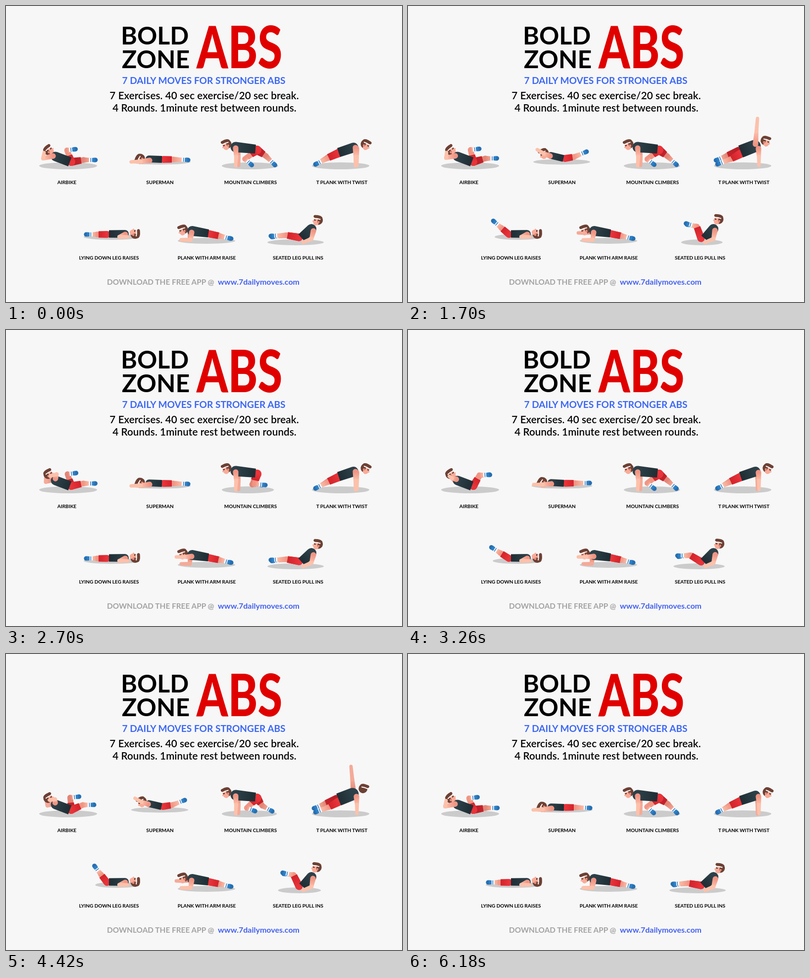
An HTML page with a canvas for the animation above (6.22 s loop, 800 by 600 pixels).

```html
<!DOCTYPE html>
<html lang="en">
<head>
<meta charset="utf-8">
<title>Daily moves</title>
<style>
html, body { margin: 0; width: 100%; height: 100%; overflow: hidden; background: #f7f7f7; }
canvas, svg { position: absolute; left: 0; top: 0; width: 800px; height: 600px; }
text { font-family: Lato, "Open Sans", sans-serif; font-weight: 700; }
.title { font-size: 50px; }
.big { font-size: 119px; font-weight: 800; fill: #e00000; }
.mid { text-anchor: middle; }
.sub { font-size: 19.1px; fill: #3b67f6; }
.info { font-size: 20.6px; font-weight: 600; letter-spacing: .1px; }
.label { font-size: 10px; }
.foot { font-size: 15.4px; fill: #a3a3a3; }
.link { font-size: 16px; fill: #4361ee; }
</style>
</head>
<body>
<canvas id="stage" width="800" height="600"></canvas>
<svg viewBox="0 0 800 600">
  <text class="title" x="232" y="78">BOLD</text>
  <text class="title" x="234" y="126">ZONE</text>
  <text class="big" transform="translate(385 126) scale(.76 1)">ABS</text>
  <text class="mid sub" x="399.5" y="158">7 DAILY MOVES FOR STRONGER ABS</text>
  <text class="mid info" x="400.5" y="189">7 Exercises. 40 sec exercise/20 sec break.</text>
  <text class="mid info" x="401" y="214">4 Rounds. 1minute rest between rounds.</text>
  <g class="mid label">
    <text x="123" y="361">AIRBIKE</text>
    <text x="311" y="361">SUPERMAN</text>
    <text x="494" y="361">MOUNTAIN CLIMBERS</text>
    <text x="678.5" y="361">T PLANK WITH TWIST</text>
    <text x="208" y="514">LYING DOWN LEG RAISES</text>
    <text x="405.5" y="514">PLANK WITH ARM RAISE</text>
    <text x="590" y="514">SEATED LEG PULL INS</text>
  </g>
  <text class="foot" x="204" y="565">DOWNLOAD THE FREE APP @</text>
  <text class="link" x="428" y="565">www.7dailymoves.com</text>
</svg>
<script>
const ctx = document.getElementById('stage').getContext('2d');
const LOOP = 6220, STEP = 40, HOLD = 100;

// Colour pairs run along a limb from its first end to its second.
const SKIN = ['#f09584', '#fcc1ab'], SKIN_FAR = ['#e38576', '#f4aa97'];
const RED = ['#e8343a', '#d3222a'], RED_FAR = ['#b51f27', '#c4232b'];
const TANK = ['#2d4048', '#1f2d34'];
const HAIR = '#6d4034', BLUE = '#2f80c6', SHADOW = '#cbcbcb', FACE = '#f8ab98';

const mix = (a, b, u) => a + (b - a) * u;
const at = (p, q, u) => [mix(p[0], q[0], u), mix(p[1], q[1], u)];
const polar = (p, deg, r) => {
  const a = deg * Math.PI / 180;
  return [p[0] + r * Math.cos(a), p[1] + r * Math.sin(a)];
};
// Curve through three points, with the middle one at u = 0.5.
const through = (p, m, q, u) => p.map((v, i) =>
  v * (1 - u) * (1 - 2 * u) + m[i] * 4 * u * (1 - u) + q[i] * u * (2 * u - 1));
const ease = u => { u = Math.min(1, Math.max(0, u)); return u * u * (3 - 2 * u); };
const swing = u => (1 - Math.cos(Math.PI * u)) / 2;

function track(t, ...keys) {
  let [t0, v0] = keys[0];
  for (const [t1, v1] of keys) {
    if (t < t1) return mix(v0, v1, ease((t - t0) / (t1 - t0)));
    [t0, v0] = [t1, v1];
  }
  return v0;
}

function ellipse(x, y, rx, ry, fill, turn = 0) {
  ctx.fillStyle = fill;
  ctx.beginPath();
  ctx.ellipse(x, y, rx, ry, turn, 0, 7);
  ctx.fill();
}

function shadow(left, right, y, ry) {
  ellipse((left + right) / 2, y, (right - left) / 2, ry, SHADOW);
}

// Tapered bar with a round start; the end is round, or cut straight for a hem.
function limb(p, q, r1, r2, colors, hem) {
  const a = Math.atan2(q[1] - p[1], q[0] - p[0]), h = Math.PI / 2;
  const g = ctx.createLinearGradient(p[0], p[1], q[0], q[1]);
  colors.forEach((c, i) => g.addColorStop(i, c));
  ctx.fillStyle = g;
  ctx.beginPath();
  ctx.arc(p[0], p[1], r1, a + h, a + 3 * h);
  if (hem) {
    for (const s of [-h, h]) ctx.lineTo(q[0] + r2 * Math.cos(a + s), q[1] + r2 * Math.sin(a + s));
  } else {
    ctx.arc(q[0], q[1], r2, a - h, a + h);
  }
  ctx.fill();
}

const torso = (shoulder, waist, r1, r2) => limb(shoulder, waist, r1, r2, TANK, true);

function arm(shoulder, elbow, hand, far) {
  const c = far ? SKIN_FAR : SKIN;
  limb(shoulder, elbow, 5.6, 4, c);
  limb(elbow, hand, 4, 3.4, [c[1], c[1]]);
}

function shin(knee, foot, far) {
  const dx = foot[0] - knee[0], dy = foot[1] - knee[1], d = Math.hypot(dx, dy);
  ctx.save();
  ctx.translate(...knee);
  ctx.rotate(Math.atan2(dy, dx));
  limb([0, 0], [Math.max(1, d - 9), 0], 5.6, 4, far ? SKIN_FAR : SKIN);
  limb([d - 1, 0], [d + 2, 0], 4.6, 4.6, [BLUE, '#256fb2']);
  for (const [x, w, c] of [[-11, 8, '#fff'], [-8.2, 1.6, BLUE], [-4.8, 2.6, BLUE]]) {
    ctx.fillStyle = c;
    ctx.fillRect(d + x, -4.1, w, 8.2);
  }
  ctx.restore();
}

// hem: how much of the thigh the shorts cover.
function leg(hip, knee, foot, far, r = 7.5, hem = .95) {
  const c = far ? SKIN_FAR : SKIN;
  limb(hip, knee, 6, 5.6, [c[0], c[0]]);
  shin(knee, foot, far);
  limb(hip, at(hip, knee, hem), r, 6.6, far ? RED_FAR : RED, true);
}

function head(p, deg, flip, back) {
  ctx.save();
  ctx.translate(...p);
  ctx.rotate(deg * Math.PI / 180);
  if (flip) ctx.scale(-1, 1);
  ellipse(-1, -1, 9, 9.4, HAIR);
  if (!back) {
    ellipse(3, 3.2, 6, 7, FACE);
    ellipse(9, 2.4, 1.7, 1.5, FACE);
    ellipse(-3, .5, 3.6, 5.4, HAIR);
    ellipse(-2, 2.8, 1.9, 2.4, '#ee9080');
    ellipse(6, -.2, 2.2, 1, '#4a2a24');
  }
  ellipse(0, -7, 8.6, 3.8, HAIR, -.1);
  ellipse(6, -7.6, 3.8, 3, HAIR);
  ctx.strokeStyle = '#fff';
  ctx.lineWidth = 2;
  ctx.beginPath();
  ctx.moveTo(-5, -3);
  ctx.quadraticCurveTo(1, -4.4, 8.6, -3.4);
  ctx.stroke();
  ctx.restore();
}

function airbike(t) {
  const u = swing(Math.min(t, 5580) / 930);
  const hip = [132, 316];
  const pedal = (v, far) => {
    const knee = polar(hip, mix(-110, -9, v), 25);
    const foot = [knee[0] + mix(15, 22, v), knee[1] - mix(2, 0, v)];
    leg(hip, knee, foot, far, 8, mix(.55, .8, v));
  };
  shadow(67, 184, 324, 7);
  arm([100, 302], at([106, 302], [80, 308], u), at([92, 298], [80, 299], u), true);
  pedal(1 - u, true);
  head([86, 293], mix(-38, -28, u));
  pedal(u, false);
  torso([100, 305], [129, 316], 9.5, 9.5);
  arm(at([95, 304], [100, 301], u), at([75, 309], [103, 292], u), at([77, 297], [90, 296], u));
}

function superman(t) {
  const u = track(t, [450, 0], [1450, 1], [1750, 1], [2600, 0], [3050, 0],
    [4050, 1], [4300, 1], [5150, 0]);
  const hip = at([318, 311], [317, 309], u);
  shadow(mix(249, 253, u), mix(373, 368, u), 316, 5.5);
  leg(hip, at([338, 311], [335, 306], u), at([366, 312], [359, 296], u), false, 7, .85);
  head(at([272, 310], [275, 299], u), mix(-65, -30, u), true);
  torso(at([289, 310], [289, 303], u), at([315, 311], [314, 309], u), 7, 7);
  arm(at([290, 313], [287, 304], u), at([272, 315], [274, 299], u),
    at([253, 316], [261, 291], u));
}

function climber(t) {
  const u = ease(swing(t / 777.5));
  const hip = [507, 292];
  const stride = (v, far) => leg(hip,
    through([483, 310], [500, 313], [525, 304], v),
    through([495, 321], [519, 314], [542, 321], v), far, 9, mix(.5, .75, v));
  shadow(436, mix(540, 550, Math.abs(2 * u - 1)), 324, 7);
  arm([468, 290], [470, 306], [470, 323], true);
  stride(1 - u, true);
  head([446, 281], -22, true);
  stride(u, false);
  torso([464, 286], [504, 290], 10.5, 9);
  arm([464, 288], [465, 306], [464, 324]);
}

function sidePlank(t) {
  const half = LOOP / 2, away = t >= half;
  const e = track(t % half, [100, 0], [950, 1], [1850, 1], [2700, 0]);
  const hand = [mix(706, away ? 697 : 706, e), mix(324, 228, e)];
  const shoulder = at([706, 287], [702, 280], e);
  const raised = () => arm(shoulder, at(shoulder, hand, .5), hand, away);
  shadow(618, 734, 324, 7);
  if (away) raised();
  leg(at([672, 298], [668, 294], e), at([650, 307], [645, 303], e),
    at([627, 320], [624, 312], e), true, 8.5);
  leg(at([672, 298], [671, 300], e), at([651, 308], [653, 310], e), [627, 320], false, 8.5);
  head(at([726, 281], [722, 274], e), mix(28, 18, e), false, away && e > .4);
  torso(at([702, 287], [700, 284], e), at([672, 297], [672, 295], e),
    mix(10, 12.5, e), mix(9.5, 13, e));
  arm([708, 289], [709, 306], [709, 323]);
  if (!away) raised();
}

function legRaise(t) {
  const u = track(t, [60, 0], [850, 1], [1050, 1], [2300, 0], [2950, 0],
    [3700, 1], [3950, 1], [5050, 0]);
  const hip = [204, 463], deg = mix(180, 267, u);
  shadow(mix(157, 195, u), 270, 468, 6);
  head([260, 462], 90, true);
  leg(hip, polar(hip, deg, 20), polar(hip, deg, 40), false, 7, .85);
  torso([240, 462], [208, 462], 8, 7.6);
  arm([241, 463], [229, 468], [246, 468]);
}

function armRaise(t) {
  const far = Math.max(
    track(t, [100, 0], [650, 1], [1720, 1], [2050, 0]),
    track(t, [3780, 0], [4250, 1], [4600, 1], [5060, 0]));
  const near = track(t, [1850, 0], [2400, 1], [3300, 1], [3800, 0]);
  const reach = (s, u, back) => arm(s,
    at([s[0] - 2, 474], [s[0] - 15, 460], u),
    at([354, 474], [344, 460], u), back);
  shadow(347, 463, 476, 6);
  reach([373, 457], far, true);
  leg([411, 462], [431, 466], [453, 471], true, 7);
  leg([411, 462], [430, 466], [452, 471], false, 7.5);
  head([358, 454], -20, true);
  torso([376, 456], [409, 461], 10, 8);
  reach([375, 459], near);
}

function pullIn(t) {
  const u = track(t, [80, 0], [1150, 1], [1500, 1], [2600, 0], [2900, 0],
    [3850, 1], [4150, 1], [5150, 0]);
  const hip = at([592, 469], [592, 471], u);
  const knee = polar(hip, mix(190, 256, u), 25);
  const foot = at([537, 466], [566, 439], u);
  shadow(mix(528, 554, u), mix(642, 635, u), 479, 6);
  leg(hip, knee, [foot[0] + 2, foot[1] + 2], true);
  head(at([630, 435], [627, 433], u), 8, true);
  leg(hip, knee, foot, false);
  torso(at([617, 452], [617, 452], u), at([597, 470], [600, 472], u), 10, 9.5);
  arm(at([621, 456], [620, 455], u), [617, 472], [600, 479]);
}

const figures = [airbike, superman, climber, sidePlank, legRaise, armRaise, pullIn];

function draw() {
  const now = performance.now() % LOOP;
  const t = now < HOLD ? 0 : HOLD + Math.floor((now - HOLD) / STEP) * STEP;
  ctx.clearRect(0, 0, 800, 600);
  figures.forEach(f => f(t));
  requestAnimationFrame(draw);
}
draw();
</script>
</body>
</html>
```
